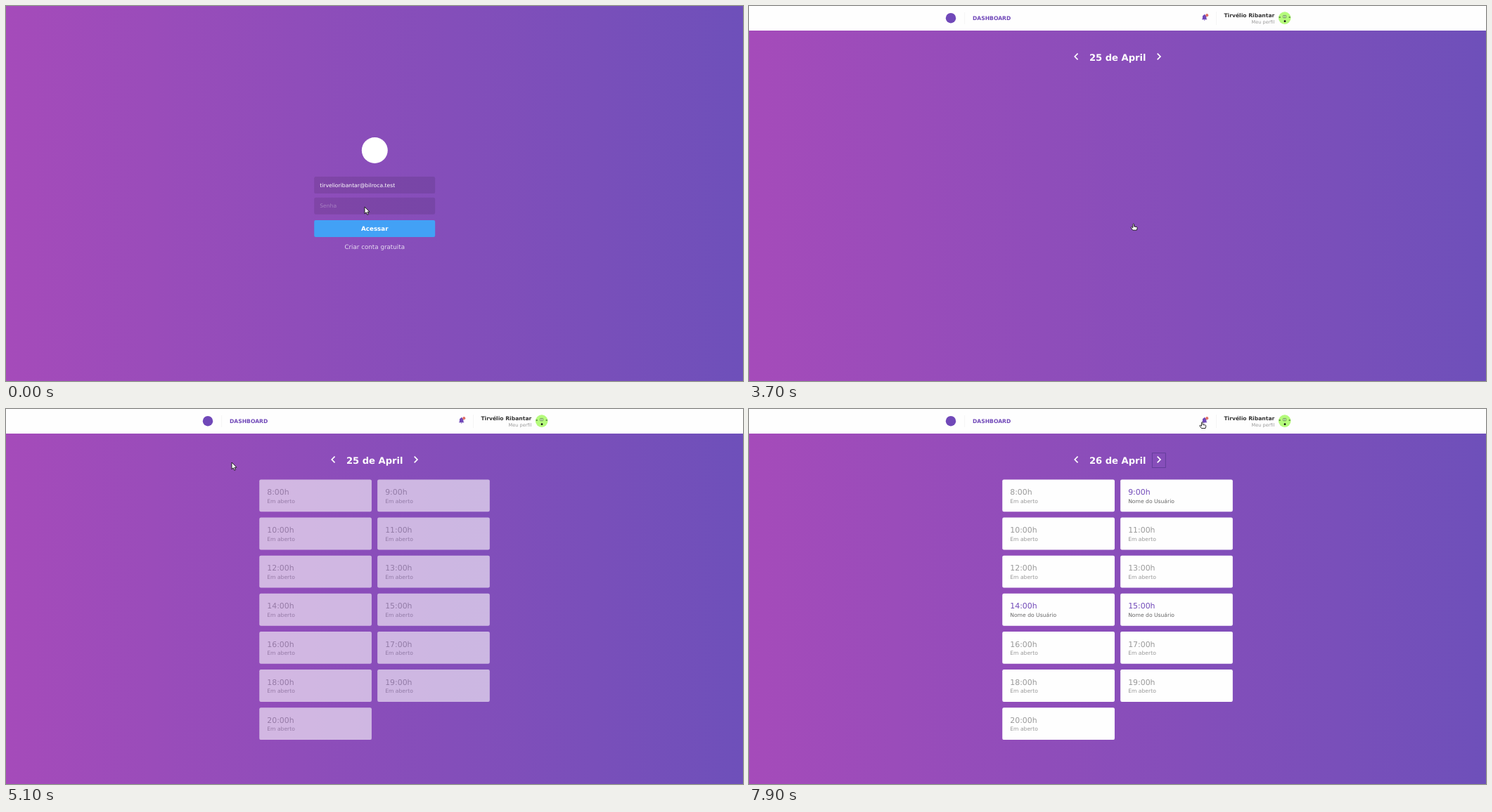
An HTML page for the animation above (8 s loop, 1048 by 534 pixels).

```html
<!DOCTYPE html>
<html lang="pt">
<head>
<meta charset="utf-8">
<title>Agenda</title>
<style>
  html, body { margin: 0; height: 100%; overflow: hidden; }
  svg { display: block; width: 1048px; height: 534px; background: linear-gradient(90deg, #a54bba, #6e50ba);
    font: 7.64px "DejaVu Sans", sans-serif; text-rendering: geometricPrecision; fill: #fff; }
  .bold { font-weight: bold; }
  .mid { text-anchor: middle; }
  .end { text-anchor: end; }
  .purple { fill: #7048b8; }
  .gray { fill: #999; }
  .field { fill: #000; opacity: .1; }
  .time { font-size: 10.92px; }
  .past { opacity: .6; }
  .card text { fill: #999; }
  .booked text { fill: #666; }
  .booked .time { fill: #7048b8; }
  #cursor path { fill: #fff; stroke: #111; stroke-width: .9; stroke-linejoin: round; }
</style>
</head>
<body>
<svg viewBox="0 0 1048 534">
  <g id="login">
    <circle cx="524.3" cy="205.5" r="18.5"/>
    <rect class="field" x="438.2" y="243.1" width="172" height="24" rx="2.2"/>
    <rect class="field" x="438.2" y="272.7" width="172" height="24" rx="2.2"/>
    <text x="446.2" y="257.8">tirvelioribantar@bilroca.test</text>
    <text id="hint" x="446.2" y="287.4" opacity=".3">Senha</text>
    <text id="dots" x="446.2" y="287.4"></text>
    <rect id="caret" width=".6" height="9"/>
    <rect id="enter" x="438.2" y="304.9" width="172" height="24" rx="2.2"/>
    <text class="bold mid" x="524.3" y="320" font-size="8.73">Acessar</text>
    <text class="mid" x="524.2" y="345.6" font-size="8.73" opacity=".8">Criar conta gratuita</text>
  </g>
  <g id="dashboard">
    <rect width="1048" height="35" fill="#fefefe"/>
    <circle class="purple" cx="287" cy="17.2" r="7.2"/>
    <path d="M306.6 9v17M664.5 8v19" stroke="#eee" stroke-width=".6"/>
    <text class="bold purple" x="318" y="20.3">DASHBOARD</text>
    <path class="purple" transform="translate(642.2 10.6) scale(.455)"
      d="M12 22c1.1 0 2-.9 2-2h-4c0 1.1.9 2 2 2zm6-6v-5c0-3.1-1.6-5.6-4.5-6.3V4a1.5 1.5 0 0 0-3 0v.7C7.6 5.4 6 7.9 6 11v5l-2 2v1h16v-1z"/>
    <circle cx="651.2" cy="13.2" r="2.1" fill="#e0736a"/>
    <text class="bold end" x="747.3" y="15.6" fill="#333">Tirvélio Ribantar</text>
    <text class="end gray" x="747.3" y="25.3" font-size="6.55">Meu perfil</text>
    <circle cx="761.7" cy="17.1" r="8.8" fill="#b5fb7c"/>
    <path d="M753.6 15.2h2.2v1.6h-2.2zM767.6 15.2h2.2v1.6h-2.2z" fill="#4c7a3c"/>
    <path d="M759.6 16.8v-3.4h4v3.4zM761.6 13.4v3.4" fill="#d9f7c4" stroke="#5d8a4c" stroke-width=".7"/>
    <circle cx="762" cy="21.7" r="1.4" fill="#111"/>
    <path id="prev" transform="translate(455.5 62.2) scale(.819)" d="M15.4 7.4 14 6l-6 6 6 6 1.4-1.4L10.8 12z"/>
    <path transform="translate(592.7 62.2) scale(-.819 .819)" d="M15.4 7.4 14 6l-6 6 6 6 1.4-1.4L10.8 12z"/>
    <rect id="focus" x="573.3" y="62.7" width="19" height="20.8" fill="none" stroke="#5c3a94" stroke-width=".8"/>
    <text id="day" class="bold mid" x="524.2" y="78.2" font-size="13.1"></text>
    <g id="cards"></g>
  </g>
  <g id="cursor">
    <path id="arrow" d="M0 0V9.8L2.2 7.8 3.8 11.3 5.5 10.6 3.9 7.2H7Z"/>
    <path id="hand" d="M-.9.8Q0-.5.9.8V4L4.5 4.6Q5.6 5 5.4 6.2L4.6 9.2H-1L-3.6 5.6Q-3.2 4.3-2 5L-.9 6Z"/>
    <g id="beam" fill="none">
      <path d="M-2-4.6Q0-4.6 0-3.6 0-4.6 2-4.6M0-3.6V3.6M-2 4.6Q0 4.6 0 3.6 0 4.6 2 4.6" style="fill:none;stroke:#bbb;stroke-width:1.8"/>
      <path d="M-2-4.6Q0-4.6 0-3.6 0-4.6 2-4.6M0-3.6V3.6M-2 4.6Q0 4.6 0 3.6 0 4.6 2 4.6" style="fill:none;stroke:#222"/>
    </g>
  </g>
</svg>
<script>
const $ = id => document.getElementById(id);
const show = (id, on) => $(id).style.display = on ? '' : 'none';
const LOOP = 8000, STEP = 100;
const CHAR = 4.51;                                  // advance of one password dot
const typed = [1100, 1300, 1500, 1800, 2100, 2300];
const bookedHours = [9, 14, 15];

// time, x, y of the pointer
const track = [
  [0, 510, 286], [300, 510, 286], [400, 512, 287], [3000, 512, 287], [3200, 590, 266],
  [3300, 608, 276], [3500, 546.7, 310], [4500, 546.7, 310], [4600, 297.4, 72.7],
  [4800, 297.4, 72.7], [4900, 317.4, 74], [5000, 317.4, 74], [5100, 321, 76],
  [5200, 324.5, 68.5], [5300, 324.5, 68.5], [5600, 500, 34], [5800, 640, 17],
  [5900, 636, 22], [6200, 584.2, 74.3], [6300, 584.2, 74.3], [6400, 585.4, 75.2],
  [7400, 585.4, 75.2], [7900, 644.4, 18.3]
];
const shapes = [
  [0, 'arrow'], [400, 'beam'], [3500, 'hand'], [3800, 'arrow'], [5800, 'hand'],
  [5900, 'arrow'], [6200, 'hand'], [7600, 'arrow'], [7900, 'hand']
];

const cards = Array.from({ length: 13 }, (_, i) => {
  const x = 360.25 + i % 2 * 167.9, y = 100.4 + (i >> 1) * 54.13;
  const hour = 8 + i;
  $('cards').insertAdjacentHTML('beforeend', `<g class="card">
    <rect x="${x}" y="${y}" width="159.7" height="45.9" rx="2.2" fill="#fefefe"/>
    <text class="time" x="${x + 11}" y="${y + 21.6}">${hour}:00h</text>
    <text x="${x + 11}" y="${y + 33.1}"></text></g>`);
  const node = $('cards').lastElementChild;
  return { node, label: node.lastElementChild, reserved: bookedHours.includes(hour) };
});

function pointerAt(t) {
  const i = track.findLastIndex(k => k[0] <= t);
  const a = track[i], b = track[i + 1] || a;
  const p = b === a ? 0 : (t - a[0]) / (b[0] - a[0]);
  return [a[1] + (b[1] - a[1]) * p, a[2] + (b[2] - a[2]) * p];
}

function drawLogin(t) {
  const count = typed.filter(k => k <= t).length;
  const inEmail = t < 400;
  $('dots').textContent = '•'.repeat(count);
  show('hint', !count);
  show('caret', t >= 300 && !(t >= 1600 && t < 1800) && !(t >= 2800 && t < 3300));
  $('caret').setAttribute('x', inEmail ? 554 : 446.3 + count * CHAR);
  $('caret').setAttribute('y', inEmail ? 250.3 : 280);
  $('enter').setAttribute('fill', t >= 3500 ? '#329af5' : '#42a1f6');
}

function drawDashboard(t) {
  const loaded = t >= 7000;
  $('day').textContent = `${t < 6600 ? 25 : 26} de April`;
  show('focus', t >= 6600);
  show('cards', t >= 4000);
  for (const { node, label, reserved } of cards) {
    const booked = loaded && reserved;
    node.classList.toggle('past', !loaded);
    node.classList.toggle('booked', booked);
    label.textContent = booked ? 'Nome do Usuário' : 'Em aberto';
  }
}

function draw(now) {
  const t = Math.floor(now % LOOP / STEP) * STEP;
  const inLogin = t < 3700;
  show('login', inLogin);
  show('dashboard', !inLogin);
  (inLogin ? drawLogin : drawDashboard)(t);
  const shape = shapes.findLast(k => k[0] <= t)[1];
  for (const id of ['arrow', 'hand', 'beam']) show(id, id === shape);
  $('cursor').setAttribute('transform', `translate(${pointerAt(t)})`);
}

const start = performance.now();
function tick() {
  draw(performance.now() - start);
  requestAnimationFrame(tick);
}
tick();
</script>
</body>
</html>
```
